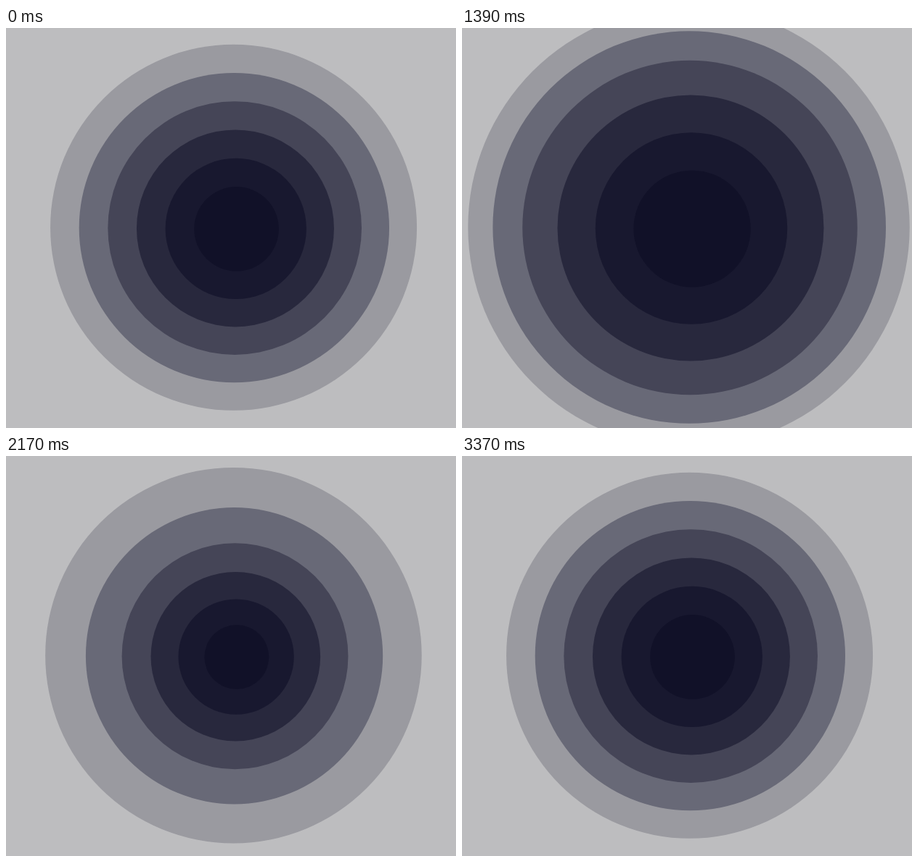
An HTML page with a canvas that plays this animation: 620 px wide and 552 px high, repeating every 3.7 s.

```html
<!DOCTYPE html>
<html>
<head>
<meta charset="utf-8">
<title>Pulsing rings</title>
<style>
html, body { margin: 0; width: 100%; height: 100%; overflow: hidden; background: #bdbdbf; }
canvas { display: block; }
</style>
</head>
<body>
<canvas id="stage" width="620" height="552"></canvas>
<script>
const ctx = document.getElementById('stage').getContext('2d');
const LOOP = 3700, FIRST = 220, LAST = 3370, STEP = 30;
const SWELL = 58.3, DIP = -19.5, RETURN = 820;

// Innermost ring first; times in ms when it starts, peaks and is smallest.
const rings = [
  { color: '#111128', start: 165, peak: 950, low: 1875 },
  { color: '#18182f', start: 215, peak: 1035, low: 2000 },
  { color: '#28283d', start: 310, peak: 1160, low: 2105 },
  { color: '#454557', start: 405, peak: 1285, low: 2222 },
  { color: '#686977', start: 580, peak: 1470, low: 2390 },
  { color: '#9a9aa0', start: 708, peak: 1580, low: 2555 }
];

function ease(t, t0, t1, from, to) {
  const p = Math.min(1, Math.max(0, (t - t0) / (t1 - t0)));
  return from + (to - from) * (1 - Math.cos(Math.PI * p)) / 2;
}

function growth(ring, t) {
  if (t < ring.peak) return ease(t, ring.start, ring.peak, 0, SWELL);
  if (t < ring.low) return ease(t, ring.peak, ring.low, SWELL, DIP);
  return ease(t, ring.low, ring.low + RETURN, DIP, 0);
}

function stepped(t) {
  if (t < FIRST) return 0;
  return Math.min(LAST, FIRST + Math.floor((t - FIRST) / STEP) * STEP);
}

function draw(t) {
  ctx.fillStyle = '#bdbdbf';
  ctx.fillRect(0, 0, 620, 552);
  for (let i = rings.length - 1; i >= 0; i--) {
    const r = 58.3 + 38.84 * i + growth(rings[i], t);
    // The centre drifts up and left as a ring gets larger.
    ctx.beginPath();
    ctx.arc(318.7 - 0.0203 * r, 277.9 - 0.0105 * r, r, 0, Math.PI * 2);
    ctx.fillStyle = rings[i].color;
    ctx.fill();
  }
}

const begin = performance.now();
function tick() {
  draw(stepped((performance.now() - begin) % LOOP));
  requestAnimationFrame(tick);
}
tick();
</script>
</body>
</html>
```
